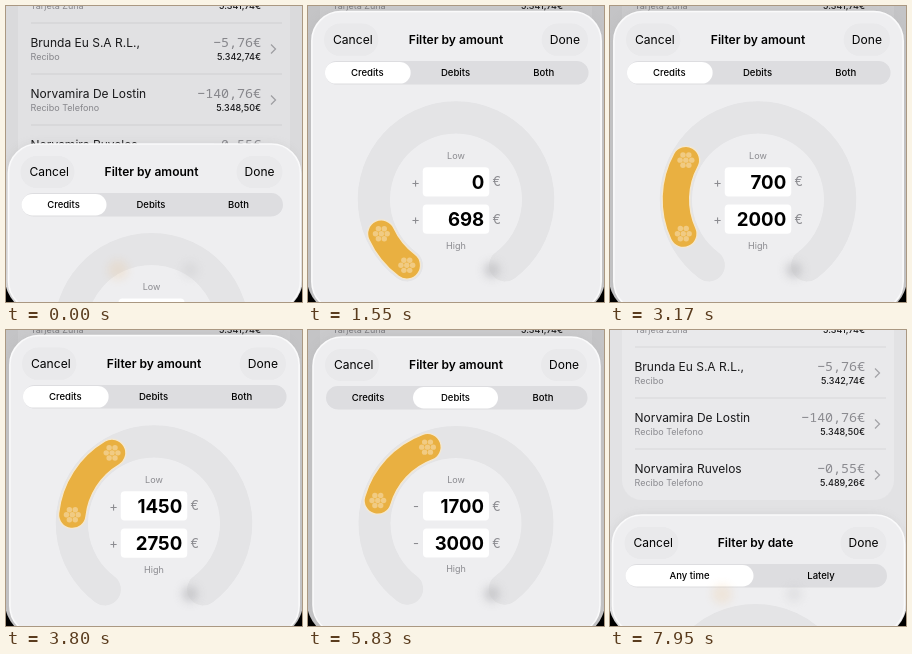
An HTML page that plays this animation: 296 px wide and 296 px high, repeating every 8 s.

```html
<!DOCTYPE html>
<html lang="es">
<head>
<meta charset="utf-8">
<style>
  html, body { margin: 0; width: 100%; height: 100%; overflow: hidden; background: #000; }
  svg { display: block; width: 100vw; height: 100vh; font-family: Inter, Roboto, sans-serif; }
  .mid { text-anchor: middle; }
  .end { text-anchor: end; }
  .gray { fill: #8b8b90; }
  .bold { font-weight: 700; }
  .semi { font-weight: 600; }
  .med { font-weight: 500; }
  .mono { font-family: "Noto Sans Mono", "DejaVu Sans Mono", monospace; font-weight: 300; }
</style>
</head>
<body>
<svg id="stage" viewBox="0 0 296 296"></svg>
<script>
const LOOP = 8000, CX = 148, CY = 193.5, R = 81.5, MAX = 7000, TOP = 7;

// Text whose capitals are centred on y.
const text = (x, y, size, str, cls = '', id = '') =>
  `<text x="${x}" y="${y + size * 0.36}" font-size="${size}" class="${cls}" id="${id}">${str}</text>`;
const rect = (x, y, w, h, r, fill, extra = '') =>
  `<rect x="${x}" y="${y}" width="${w}" height="${h}" rx="${r}" fill="${fill}" ${extra}/>`;

const row = ([name, kind, amount, balance], i) => {
  const y = 36.5 + (i - 1) * 51;
  return text(24.5, y, 12, name) + text(24.5, y + 14.5, 9, kind, 'gray') +
    text(255, y, 13.3, amount, 'mono gray end') + text(255, y + 14.5, 9, balance, 'med end') +
    `<path d="M265 ${y + 2}l4.5 4.5l-4.5 4.5" fill="none" stroke="#a5a5a9" stroke-width="1.3"/>` +
    (i < 3 ? `<path d="M25 ${y + 31.5}H276" stroke="#d2d2d5" stroke-width=".8"/>` : '');
};
const rows = [
  ['Tarjeta', 'Tarjeta Zuna', '', '5.341,74€'],
  ['Brunda Eu S.A R.L.,', 'Recibo', '−5,76€', '5.342,74€'],
  ['Norvamira De Lostin', 'Recibo Telefono', '−140,76€', '5.348,50€'],
  ['Norvamira Ruvelos', 'Recibo Telefono', '−0,55€', '5.489,26€'],
];

const angle = v => (126.8 + 286.4 * v / MAX) * Math.PI / 180;
const point = v => [CX + R * Math.cos(angle(v)), CY + R * Math.sin(angle(v))];
const arc = (a, b) => `M${point(a)}A${R} ${R} 0 ${b - a > MAX * 180 / 286.4 ? 1 : 0} 1 ${point(b)}`;

const dots = [...Array(7).keys()].map(i => {
  const a = i * Math.PI / 3, r = i < 6 ? 5.8 : 0;
  return `<circle cx="${r * Math.cos(a)}" cy="${r * Math.sin(a)}" r="2.7"/>`;
}).join('');

const field = (y, id) => rect(115, y - 14.5, 66, 29, 4, '#fff') +
  text(176, y, 18.5, '', 'bold end', id) +
  text(108, y, 13, '', 'mid gray', id + 'Sign') + text(188.5, y, 12.5, '€', 'mid gray');

const stage = document.getElementById('stage');
stage.innerHTML = `
  <defs>
    <clipPath id="screen"><rect x="-1" y="-50" width="298" height="358" rx="36"/></clipPath>
    <filter id="soft" x="-1" y="-1" width="3" height="3"><feGaussianBlur stdDeviation="4"/></filter>
    <filter id="shade" x="-.2" y="-.2" width="1.4" height="1.4"><feGaussianBlur stdDeviation="5"/></filter>
  </defs>
  <g clip-path="url(#screen)">
    ${rect(-1, -1, 298, 298, 0, '#e2e2e4')}
    ${rect(12, -40, 272, 210, 20, '#e9e9eb')}
    <g fill="#19191b">${rows.map(row).join('')}</g>
    ${rect(-1, -1, 298, 310, 0, '#000', 'id="dim"')}
    <g id="sheet">
      ${rect(4, TOP, 288, 297, 30, '#aaa', 'id="shadow" filter="url(#shade)" opacity=".3"')}
      ${rect(5, TOP, 287, 297, 29, '#eeeef0', 'id="panel" stroke="#fafafb" stroke-width="1.6"')}
      ${rect(17, 19, 54, 32, 16, '#e9e9eb')}
      ${rect(233, 19, 46, 32, 16, '#e9e9eb')}
      ${text(26, 35, 12, 'Cancel', '', 'cancel')}
      ${text(271, 35, 12, 'Done', 'end')}
      ${rect(18, 56, 261.5, 23.5, 11.75, '#dddde0')}
      ${rect(18, 57, 85, 21.5, 10.75, '#fff', 'id="thumb"')}
      <g id="amount">
        ${text(148, 35, 12, 'Filter by amount', 'mid semi')}
        ${text(60, 68, 9.5, 'Credits', 'mid med')}
        ${text(147.5, 68, 9.5, 'Debits', 'mid med')}
        ${text(235, 68, 9.5, 'Both', 'mid med')}
      </g>
      <g id="date">
        ${text(148, 35, 12, 'Filter by date', 'mid semi')}
        ${text(82, 68, 9.5, 'Any time', 'mid med')}
        ${text(213.5, 68, 9.5, 'Lately', 'mid med')}
      </g>
      <path d="${arc(0, MAX)}" fill="none" stroke="#e4e4e6" stroke-width="32" stroke-linecap="round"/>
      <g id="range">
        <path id="rim" fill="none" stroke="#f5e8cf" stroke-width="28.5" stroke-linecap="round"/>
        <path id="pill" fill="none" stroke="#e9b041" stroke-width="26" stroke-linecap="round"/>
        <g id="lowKnob" fill="#f1cb83">${dots}</g>
        <g id="highKnob" fill="#f1cb83">${dots}</g>
      </g>
      ${text(148, 150, 9, 'Low', 'mid gray')}
      ${field(176, 'low')}
      ${field(213, 'high')}
      ${text(148, 239, 9, 'High', 'mid gray')}
    </g>
    <circle id="spot" cx="184" cy="264" r="8" fill="#c3c3c6" filter="url(#soft)"/>
    <circle id="glow" cx="112" cy="264" r="10" fill="#f0b060" filter="url(#soft)"/>
  </g>`;

const el = {};
stage.querySelectorAll('[id]').forEach(e => { if (e.id) el[e.id] = e; });
const set = (id, attrs) => { for (const k in attrs) el[id].setAttribute(k, attrs[k]); };

// Progress 0..1 in n equal steps; the first falls at a, the last at b.
const steps = (t, a, b, n) =>
  t < a ? 0 : Math.min(n, Math.floor((t - a) / (b - a) * (n - 1) + 0.03) + 1) / n;
// Value at progress p along evenly spaced stops.
const along = (p, stops) => {
  const x = p * (stops.length - 1), i = Math.min(Math.floor(x), stops.length - 2);
  return stops[i] + (stops[i + 1] - stops[i]) * (x - i);
};

function draw(t) {
  const rise = steps(t, 110, 430, 4), leave = steps(t, 7640, 7950, 4);
  const y = leave ? along(leave, [7, 7, 60, 148, 185]) : along(rise, [138, 62, 23, 10, 7]);
  const down = Math.min(1, (y - TOP) / 80);
  const fade = Math.min(1, Math.max(0, leave * 2 - 0.5));

  const press = t < 2730 ? (t >= 1550 ? 1 - steps(t, 2090, 2300, 3) : 0)
    : steps(t, 2730, 2840, 2) - steps(t, 4330, 4640, 4);
  const zoom = 1 + 0.008 * press;
  set('sheet', { transform: `translate(${CX - 2.5 * down} ${192 + y - TOP}) scale(${zoom}) translate(${-CX} -192)` });
  for (const id of ['panel', 'shadow']) set(id, { height: 304 - y, width: 287 + 5 * down });
  set('dim', { opacity: 0.135 * (185 - y) / 178 });
  set('spot', { opacity: 0.8 - 0.5 * down });
  set('glow', { opacity: 0.15 * down });

  // The upper handle is pulled first, then the whole range is dragged.
  const shift = along(steps(t, 2730, 3490, 8), [0, 0, 100, 300, 500, 700, 850, 950, 1050]) +
    along(steps(t, 3590, 4110, 6), [0, 100, 250, 400, 520, 600, 650]);
  const low = Math.round(shift);
  const high = Math.round(shift +
    along(steps(t, 1550, 2300, 8), [500, 698, 850, 980, 1090, 1180, 1250, 1290, 1300]));
  for (const id of ['rim', 'pill']) set(id, { d: arc(low, high) });
  for (const [id, v] of [['low', low], ['high', high]]) {
    el[id].textContent = v;
    set(id + 'Knob', { transform: `translate(${point(v)})` });
  }

  const swap = steps(t, 5520, 5830, 4);
  el.lowSign.textContent = el.highSign.textContent = swap < 0.5 ? '+' : '-';
  const tab = 18 + 87 * along(swap, [0, 0.2, 0.7, 0.95, 1]);
  set('thumb', { x: tab + (18 - tab) * fade, width: 85 + 43 * fade });

  set('cancel', { opacity: leave === 0.25 ? 0.2 : 1 });
  set('amount', { opacity: 1 - fade });
  set('date', { opacity: fade });
  set('range', { opacity: 1 - fade });
}

const start = performance.now();
function tick() {
  draw((performance.now() - start) % LOOP);
  requestAnimationFrame(tick);
}
tick();
</script>
</body>
</html>
```
